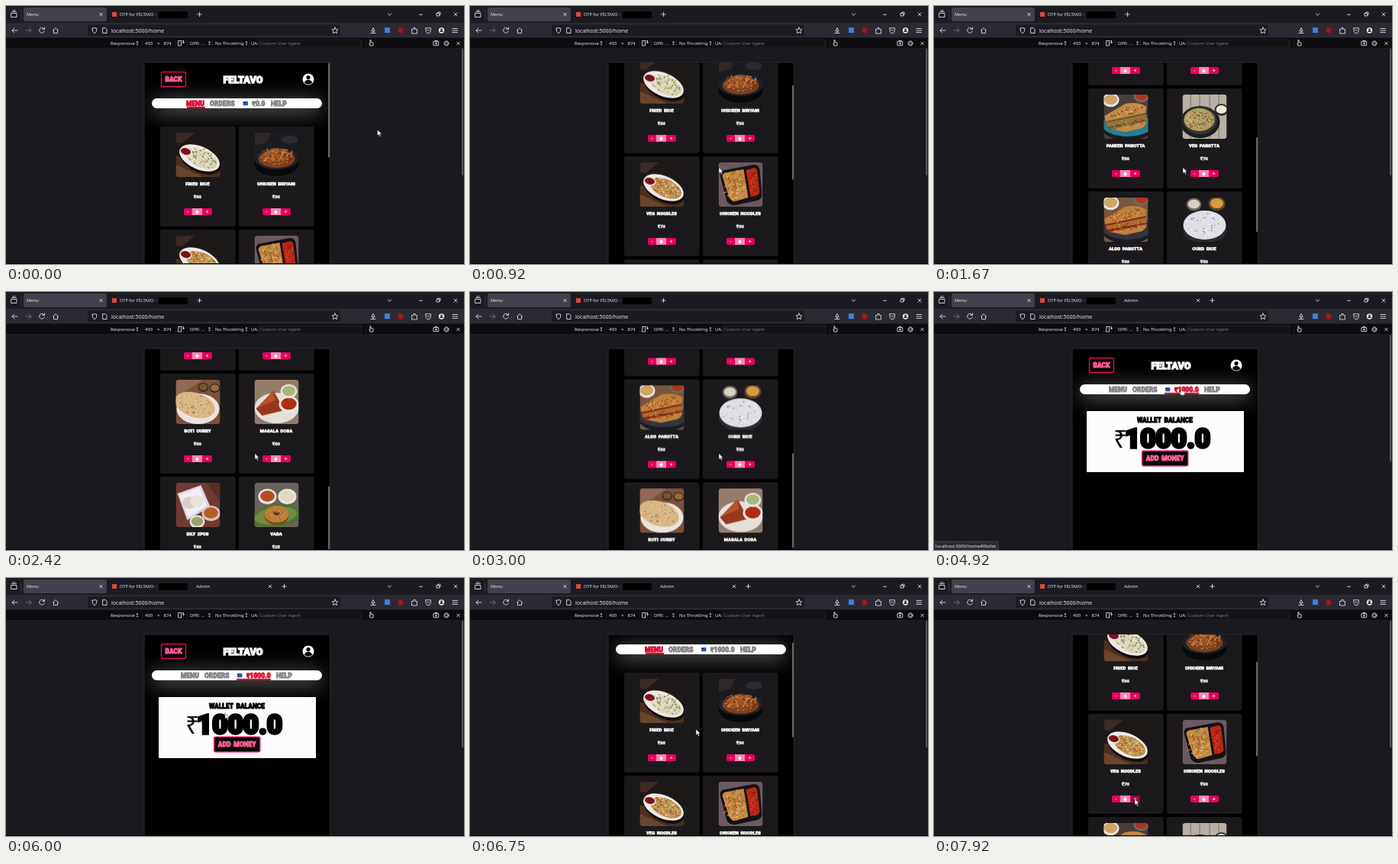
Animation of 600x338 px, one loop 8000 ms. Source, as an HTML page:

```html
<!DOCTYPE html>
<html lang="en">
<head>
<meta charset="utf-8">
<title>Menu</title>
<style>
@property --scroll { syntax: "<number>"; inherits: true; initial-value: 0; }
html, body { margin: 0; width: 100%; height: 100%; overflow: hidden; background: #1b1a1e; }
svg { position: fixed; inset: 0; width: 100vw; height: 100vh; animation: scroll 8s linear infinite; }
text { font-family: "Noto Sans", "Open Sans", sans-serif; white-space: pre; }
.block { font-family: Roboto, "Liberation Sans", sans-serif; font-weight: 900; word-spacing: .2em; stroke-width: .1em; fill: currentColor; stroke: currentColor; stroke-linejoin: miter; }
.mid { text-anchor: middle; }
.icon { fill: none; stroke: #e4e4ea; stroke-width: .85; stroke-linejoin: round; stroke-linecap: round; }
.pill { filter: drop-shadow(0 4px 13px rgba(255,255,255,.5)); }
.page { transform: translateY(calc(var(--scroll) * -1px)); }
.thumb { transform: translateY(calc(var(--scroll) * .3047px)); }
.cursor { animation: cursor 8s ease-in-out infinite; }
.step { animation: 8s step-end infinite; }
.before { animation-name: before; }
.after { animation-name: after; }
.grid { animation-name: grid; }
.wallet { animation-name: wallet; }
.paid { animation-name: paid; }
.linkWallet { animation-name: linkWallet; }
.linkMenu { animation-name: linkMenu; }
.hand { animation-name: hand; }
.arrow { animation-name: arrow; }
.zero { animation-name: zero; }
.one { animation-name: one; }
.hover { animation-name: hover; }
.bar { animation-name: bar; }
@keyframes scroll {
  0%, 7.5% { --scroll: 0; }
  20.85%, 21.87% { --scroll: 320; }
  30.2%, 32.2% { --scroll: 591; }
  44.7%, 45.87% { --scroll: 256; }
  51%, 82% { --scroll: 0; }
  84.3%, 85.37% { --scroll: 34; }
  88.5%, 100% { --scroll: 115; }
}
@keyframes cursor {
  0%, 1% { transform: translate(486.5px, 162px); }
  8%, 49% { transform: translate(326px, 211.5px); }
  54%, 64.6% { transform: translate(324px, 126px); }
  69%, 73% { transform: translate(301px, 192px); }
  79%, 81% { transform: translate(241px, 127px); }
  84.3%, 86% { transform: translate(296px, 198px); }
  91.5%, 94.5% { transform: translate(263px, 153px); }
  98.9%, 100% { transform: translate(263px, 289.5px); }
}
@keyframes before { 0% { opacity: 1; } 53.1%, 100% { opacity: 0; } }
@keyframes after { 0% { opacity: 0; } 53.1%, 100% { opacity: 1; } }
@keyframes grid { 0% { opacity: 1; } 57.3% { opacity: 0; } 80.5%, 100% { opacity: 1; } }
@keyframes wallet { 0% { opacity: 0; } 57.3% { opacity: 1; } 80.5%, 100% { opacity: 0; } }
@keyframes paid { 0% { opacity: 0; } 53.1% { opacity: 1; } 57.3% { opacity: 0; } 80.5%, 100% { opacity: 1; } }
@keyframes linkWallet { 0% { opacity: 0; } 54.2% { opacity: 1; } 64.6%, 100% { opacity: 0; } }
@keyframes linkMenu { 0% { opacity: 0; } 79.1% { opacity: 1; } 82.2%, 100% { opacity: 0; } }
@keyframes hand { 0% { opacity: 0; } 53.5% { opacity: 1; } 64.6% { opacity: 0; } 78.8% { opacity: 1; } 82%, 100% { opacity: 0; } }
@keyframes arrow { 0% { opacity: 1; } 53.5% { opacity: 0; } 64.6% { opacity: 1; } 78.8% { opacity: 0; } 82%, 100% { opacity: 1; } }
@keyframes zero { 0% { opacity: 1; } 93%, 100% { opacity: 0; } }
@keyframes one { 0% { opacity: 0; } 93%, 100% { opacity: 1; } }
@keyframes hover { 0% { opacity: 0; } 98.5%, 100% { opacity: 1; } }
@keyframes bar { 0% { opacity: 1; } 25% { opacity: 0; } 49%, 100% { opacity: 1; } }
</style>
</head>
<body>
<svg id="stage" viewBox="0 0 600 338" xmlns="http://www.w3.org/2000/svg"></svg>
<script>
const PINK = '#e8005f', ROSE = '#ff5f97', RED = '#dc0a2c', GREY = '#83838b', BRAND = 'FELTAVO';

const rect = (x, y, w, h, fill, extra = '') =>
  `<rect x="${x}" y="${y}" width="${w}" height="${h}" fill="${fill}" ${extra}/>`;
const oval = (x, y, rx, ry, fill, turn = 0) =>
  `<ellipse cx="${x}" cy="${y}" rx="${rx}" ry="${ry}" fill="${fill}" transform="rotate(${turn} ${x} ${y})"/>`;
const shape = (d, fill) => `<path d="${d}" fill="${fill}"/>`;
const poly = (points, fill) => `<polygon points="${points}" fill="${fill}"/>`;
const icon = (d, extra = '') => `<path class="icon" d="${d}" ${extra}/>`;
const ui = (x, y, str, size, fill = '#e6e6eb') =>
  `<text x="${x}" y="${y}" font-size="${size}" fill="${fill}">${str}</text>`;
const block = (x, y, str, size, color, mid = true) =>
  `<text class="block ${mid ? 'mid' : ''}" x="${x}" y="${y}" font-size="${size}" color="${color}">${str}</text>`;
const step = (name, body) => `<g class="step ${name}">${body}</g>`;

// Short strokes scattered over a tilted ellipse: rice, noodles, spices.
function grains(x, y, rx, ry, colors, seed, count = 36, length = 3, turn = 0) {
  const random = () => (seed = (seed * 16807) % 2147483647) / 2147483647;
  for (let i = 0; i < 5; i++) random();
  let out = '';
  for (let i = 0; i < count; i++) {
    const a = random() * 6.283, r = Math.sqrt(random()), b = random() * 6.283;
    const px = x + rx * r * Math.cos(a), py = y + ry * r * Math.sin(a);
    const dx = length * Math.cos(b), dy = length * Math.sin(b);
    out += `<path d="M${px.toFixed(1)} ${py.toFixed(1)}l${dx.toFixed(1)} ${dy.toFixed(1)}" stroke="${colors[i % colors.length]}"/>`;
  }
  return `<g transform="rotate(${turn} ${x} ${y})">${out}</g>`;
}

const bowl = (x, y, r, fill, rim = '#e9e4dc') => oval(x, y, r, r * .85, rim) + oval(x, y - .5, r * .78, r * .6, fill);
const ovalPlate = (food, colors, seed) =>
  rect(0, 0, 58, 58, '#1e1817') + poly('0,30 58,48 58,58 0,58', '#4b2f20') + poly('0,42 36,58 0,58', '#6b452c') + poly('0,0 25,0 8,14 0,13', '#3b2a25') +
  oval(32, 37, 28, 15, '#100b0a', 24) + oval(31, 33, 28, 15, '#eeeae8', 24) + oval(34, 34, 22, 11.5, food, 24) +
  grains(34, 33, 20, 11, colors, seed, 90, 2.5, 24) + oval(13, 25, 8, 5.5, '#e4dcda', 14) + oval(13, 24.5, 6.6, 4.3, '#7e1119', 14);
const stack = (back, plate, bread, filling, seed) =>
  rect(0, 0, 58, 58, back) + bowl(9, 7, 11, '#d0a465') + bowl(49, 2, 10, '#a9351f', '#77675b') +
  oval(31, 43, 34, 17, '#191c24') + oval(31, 40, 33, 15, plate) +
  poly('1,34 53,22 56,28 3,41', filling) + shape('M1 28L28 12Q46 9 56 16L55 24L2 35Z', bread) +
  poly('3,42 55,32 56,36 8,46', filling) + shape('M3 37L56 26L56 33L4 42Z', '#a86c31') + shape('M8 45L56 35Q56 40 50 44L28 49Z', bread) +
  grains(30, 23, 24, 6, ['#8a4a1c', '#e6b570', '#6b3a18'], seed, 40, 2.5, -14) + grains(32, 39, 23, 5, ['#6f401c', filling, '#dba25a'], seed + 2, 34, 2.5, -12);

const dishes = [
  ['FRIED RICE', 60, ovalPlate('#d9d5b8', ['#fbf8e6', '#7f9650', '#c9a862', '#f0ead0', '#5f5840'], 11)],
  ['CHICKEN BIRYANI', 90, rect(0, 0, 58, 58, '#1b1c20') + poly('0,0 22,0 16,13 0,17', '#2f2826') + oval(46, 9, 11, 5, '#2b2c31') +
    oval(29, 41, 29, 16, '#08090b') + oval(29, 34, 29, 14, '#212226') + oval(29, 34, 24, 12, '#7d3f1f') +
    oval(29, 29, 15, 9, '#9d5528') + grains(29, 31, 22, 11, ['#d8934d', '#552712', '#e0a962', '#a94f20'], 23, 90)],
  ['VEG NOODLES', 70, ovalPlate('#c59455', ['#ecc67e', '#7c421f', '#f0dfae', '#6e7d40', '#b5562a'], 31)],
  ['CHICKEN NOODLES', 90, rect(0, 0, 58, 58, '#6d5a60') + shape('M2 17Q2 10 9 10L46 3Q53 3 54 9L57 42Q57 48 51 50L22 56Q15 57 11 51Z', '#151113') +
    shape('M5 18Q6 13 12 13L33 9L39 46L22 51Q17 51 14 46Z', '#c28844') + shape('M36 10L47 7Q51 8 51 13L54 39Q53 43 48 44L42 45Z', '#b92716') +
    grains(22, 30, 13, 18, ['#ecc078', '#8d5122', '#dca451', '#a8652b'], 43, 85, 5) + grains(46, 26, 5, 16, ['#e3502e', '#7e150e'], 5, 30)],
  ['PANEER PAROTTA', 60, stack('#4a3d3b', '#237f92', '#c28a46', '#56633c', 57)],
  ['VEG PAROTTA', 70, rect(0, 0, 58, 58, '#b8b0a4') + [10, 22, 35, 47].map(x => rect(x, 0, 1.2, 58, '#857d74')).join('') +
    oval(23, 36, 26, 21, '#1d1d1e') + oval(23, 34, 22, 18, '#393836') + oval(22, 33, 20, 15, '#b29c62') +
    grains(22, 33, 18, 13, ['#4e4222', '#d9c88c', '#755a2a'], 61, 80, 2.2) + bowl(51, 20, 9, '#eee9d9', '#2d2c2b')],
  ['ALOO PAROTTA', 60, stack('#78563f', '#34343d', '#c17f3b', '#8e2815', 71)],
  ['CURD RICE', 50, rect(0, 0, 58, 58, '#1c1a1e') + bowl(15, 9, 10, '#d7cec2', '#6b6058') + bowl(45, 8, 11, '#d79a3d', '#60452e') +
    oval(29, 42, 29, 18, '#2c2a30') + oval(29, 36, 28, 19, '#dedee4') + grains(29, 36, 24, 15, ['#fff', '#bfc0c9', '#f1f1f4', '#716d74'], 83, 70, 2)],
  ['ROTI CURRY', 60, rect(0, 0, 58, 58, '#7c513b') + poly('0,0 35,0 0,24', '#946853') + bowl(36, 10, 7, '#78552a', '#342d28') + bowl(51, 11, 7, '#9b6d2c', '#342d28') +
    oval(29, 38, 28, 20, '#e9e4e0') + oval(25, 33, 27, 16, '#d8b784', 18) + grains(25, 33, 24, 13, ['#8b5a2c', '#efd6aa', '#b98c50'], 97, 56, 2, 18)],
  ['MASALA DOSA', 60, rect(0, 0, 58, 58, '#947c6c') + oval(29, 37, 29, 20, '#e4dfdb') + poly('2,38 25,14 39,40 10,47', '#98371b') + poly('2,38 25,14 27,27', '#b5532a') +
    bowl(45, 32, 13, '#ad2c17') + bowl(45, 15, 11, '#a9b67b')],
  ['IDLY 2PCS', 40, rect(0, 0, 58, 58, '#703a34') + poly('40,0 58,0 58,24', '#553029') + poly('2,14 33,3 45,31 15,49', '#dcd5df') + poly('5,16 31,6 41,30 16,45', '#f3edf3') +
    oval(18, 26, 9, 8, '#d5cecb') + oval(28, 24, 9, 8, '#e9e2dc') + bowl(46, 40, 12, '#b65d23', '#d4c4bd') + bowl(28, 51, 10, '#98a36b')],
  ['VADA', 25, rect(0, 0, 58, 58, '#6b625b') + oval(28, 44, 33, 16, '#536f34', -10) + oval(28, 43, 28, 11, '#728d43', -8) +
    bowl(17, 18, 12, '#b54c22') + bowl(43, 18, 12, '#e1dac0') + oval(29, 43, 16, 12, '#7b471f') + oval(29, 41, 16, 11, '#bb7e38') +
    oval(29, 40, 4, 2.5, '#5c3519') + grains(29, 40, 13, 8, ['#d9a557', '#925b27'], 113, 30, 1.5)],
];

function card([name, price, art], i) {
  const x = i % 2 ? 305 : 202, y = 158 + 135 * Math.floor(i / 2), mid = x + 49;
  const digit = n => block(mid - .5, y + 114, n, 6, '#fff');
  return rect(x, y, 98.5, 130.7, '#1b191b', 'rx="2"') +
    `<g transform="translate(${x + 20.5} ${y + 8})" clip-path="url(#photo)">${art}</g>` +
    block(mid, y + 76.6, name, 5.9, '#fff') +
    block(mid, y + 94.4, '₹' + price, 5.9, '#e0e0e0') +
    rect(x + 31, y + 107, 37, 9, PINK, 'rx="2"') +
    (i === 2 ? step('hover', rect(x + 56, y + 107, 12, 9, '#a30042', 'rx="2"')) : '') +
    rect(x + 42, y + 107, 13, 9, '#f485b2') +
    icon(`M${x + 35.5} ${y + 111.8}h1.4M${x + 60.2} ${y + 111.5}h2.8m-1.4 -1.4v2.8`, 'stroke-width=".7"') +
    (i === 0 ? step('zero', digit(0)) + step('one', digit(1)) : digit(0));
}

function nav(x, balance, walletActive = false) {
  const money = balance === '0.0' ? 322.5 : 315, help = balance === '0.0' ? 347 : 354;
  const [menuColor, moneyColor] = walletActive ? [GREY, RED] : [RED, GREY];
  const item = (at, label, color = GREY) => block(at, 130.8, label, 8.5, color, false);
  return item(x, 'MENU', menuColor) + item(x + 31, 'ORDERS') + item(money, '₹' + balance, moneyColor) + item(help, 'HELP') +
    rect(money - 12, 125, 6.5, 5.2, '#285fae', 'rx=".7"') + rect(money - 12, 126, 4, 1, '#16305e') +
    (walletActive ? rect(302, 131.8, 45, 2.2, RED) : rect(x + 1, 131.8, 24, 2.2, RED));
}

const button = (x, y, w, h, label) =>
  rect(x, y, w, h, '#050305', `rx="2" stroke="${PINK}" stroke-width="1.4"`) + block(x + w / 2, y + h / 2 + 3, label, 8.5, ROSE);

const header = button(203.5, 86.5, 32, 19, 'BACK') + block(310.5, 100.6, BRAND, 12.7, '#fff') +
  '<circle cx="396" cy="96" r="7.5" fill="#fff"/><circle cx="396" cy="93.6" r="2.6"/><path d="M391 101a5 4.2 0 0 1 10 0q-5 3.5-10 0"/>' +
  rect(191, 121, 223, 13, '#fff', 'rx="6.5" class="pill"');

const walletPage = rect(200, 156, 206, 80, '#fdfbfd') + block(302.5, 171.2, 'WALLET BALANCE', 8.4, '#000') +
  ui(235, 204, '₹', 32, '#000') + block(250, 203.5, '1000.0', 35, '#000', false) +
  button(272.7, 208.2, 60, 19.5, 'ADD MONEY');

const close = (x, y, r = 1.8) => icon(`M${x - r} ${y - r}l${2 * r} ${2 * r}m0 ${-2 * r}l${-2 * r} ${2 * r}`, 'stroke-width=".8"');
const plus = x => icon(`M${x - 2.7} 11h5.4m-2.7 -2.7v5.4`);
const updown = x => shape(`M${x - 1.4} 48l1.4 -2.2l1.4 2.2zm0 1.4l1.4 2.2l1.4 -2.2z`, '#d0d0d6');

const tabs = rect(0, 0, 600, 23, '#1c1b22') + rect(23, 2, 109, 18, '#42414d', 'rx="2.5"') +
  icon('M7 9.5h7v5h-7zM7.5 7.5h6M9 5.8h3') + rect(19.5, 5, .7, 13, '#45444d') +
  ui(27, 13.3, 'Menu', 5.9) + close(124.5, 11) +
  rect(139, 8, 6, 6, '#e0453c') + ui(149, 13.3, `OTP for ${BRAND} -`, 5.7) + rect(200, 7, 38, 9, '#000') +
  step('before', plus(253.5)) + step('after', ui(249, 13.3, 'Admin', 5.9) + close(346, 11) + plus(364.5)) +
  icon('M500.3 10l2.2 2.2l2.2 -2.2M541.5 11.3h4M564.3 9.6h3.4v3.4h-3.4zM565.6 9.4v-1.2h3.4v3.4h-1.2', 'stroke-width=".75"') + close(589, 11, 2);

const toolbar = rect(0, 22, 600, 20, '#2b2a33') + rect(107, 24.5, 331, 14.5, '#1c1b22', 'rx="2.5"') +
  icon('M15 32h-7m3 -3l-3 3l3 3') + icon('M26 32h7m-3 -3l3 3l-3 3', 'opacity=".4"') +
  icon('M50 30a3.4 3.4 0 1 0 .3 3M50.5 28v2.5h-2.5') + icon('M61.5 32l3.5 -3.3l3.5 3.3M62.5 31.5v4h5v-4') +
  icon('M113 29.5l3 -1l3 1q0 5 -3 6.5q-3 -1.5 -3 -6.5') + icon('M127 28.7h3.4l1.6 1.6v5.2h-5z', 'stroke-width=".8"') +
  ui(138, 34.6, 'localhost:5000/home', 7) +
  icon('M431 28l1.2 2.6l2.8 .3l-2.1 2l.6 2.8l-2.5 -1.4l-2.5 1.4l.6 -2.8l-2.1 -2l2.8 -.3z', 'stroke-width=".8"') +
  icon('M478 35.5h6M479 32.5l2 -4l2 4zM481 33v2') + rect(496, 28.2, 7, 7, '#3b82e0') +
  '<circle cx="517" cy="32" r="3.6" fill="#a8141d"/>' +
  icon('M532 30.5h2v-2h2v2h2.5v5.5h-6.5zM550 28.8h6.5v3q-.5 4 -3.3 4q-2.8 0 -3.2 -4zM551.6 31l1.6 1.6l1.6 -1.6') +
  '<circle cx="570.5" cy="32" r="3.7" fill="#eee"/><circle cx="570.5" cy="30.8" r="1.3" fill="#2b2a33"/><path d="M568 34a2.5 2 0 0 1 5 0z" fill="#2b2a33"/>' +
  icon('M585 29.5h6.5m-6.5 2.5h6.5m-6.5 2.5h6.5');

const device = rect(0, 41.5, 600, 14.5, '#0d0d0f') + rect(0, 55.3, 600, .7, '#2a2a2e') +
  ui(137, 50.7, 'Responsive', 6) + updown(172) + ui(182, 50.7, '493', 6) + ui(198, 50.7, '×', 6) + ui(206.5, 50.7, '874', 6) +
  icon('M226 45.5h3.5v6.5h-3.5zM231 45.5h1.5v3m-1.2 -1l1.2 1.2l1.2 -1.2', 'stroke-width=".8"') +
  ui(241, 50.7, 'DPR: ...', 5.9) + updown(266.5) + ui(274, 50.7, 'No Throttling', 6) + updown(315) +
  ui(321, 50.7, 'UA:', 6) + rect(331, 44, 135, 10, '#141416', 'stroke="#2c2c30" stroke-width=".6"') + ui(333, 50.7, 'Custom User Agent', 5.8, '#77777e') +
  [178, 222, 237, 270, 318, 471].map(x => rect(x, 44, .5, 10, '#29292d')).join('') +
  icon('M476 49l1 3h4v-4l-3 -.8v-2.5h-1v5', 'stroke-width=".7"') +
  icon('M560.3 46.7h6.4v5h-6.4zM562 46.5v-1h3v1M563.5 48v2.4m-1.2 -1.2h2.4', 'stroke-width=".7"') +
  '<circle class="icon" cx="577" cy="49" r="2.2"/><circle class="icon" cx="577" cy="49" r="3.2" stroke-dasharray="1 1.5"/>' + close(592.5, 49);

const phone = rect(181, 74, 243.5, 270, '#000', 'stroke="#343338" stroke-width=".8"') +
  `<g clip-path="url(#screen)"><g class="page">${header}` +
  step('before', nav(236, '0.0')) + step('paid', nav(229, '1000.0')) + step('wallet', nav(229, '1000.0', true)) +
  step('grid', dishes.map(card).join('')) + step('wallet', walletPage) + '</g>' +
  step('grid', rect(422, 74.5, 2, 124, '#67666b', 'class="thumb" rx="1"')) + '</g>';

const status = (name, width) => step('link' + name,
  rect(-1, 327, width, 12, '#2b2a33', 'stroke="#55545d" stroke-width=".7"') + ui(2, 334.6, 'localhost:5000/home#' + name, 5.9));

const cursor = '<g class="cursor">' +
  step('arrow', '<path d="M0 0v8l1.9 -1.7l1.4 3l1.3 -.6l-1.3 -2.9h2.5z" fill="#fff" stroke="#111" stroke-width=".5"/>') +
  step('hand', '<path d="M-.8 0q.8 -1 1.6 0v3.5l3.4 .8q.8 .4 .6 1.6l-.8 3.4h-4.4l-2.6 -3.6q.4 -1.2 2.2 .3z" fill="#fff" stroke="#111" stroke-width=".5"/>') + '</g>';

document.getElementById('stage').innerHTML =
  '<defs><clipPath id="screen"><rect x="181.5" y="74.5" width="242.5" height="264"/></clipPath>' +
  '<clipPath id="photo"><rect width="58" height="58" rx="4"/></clipPath></defs>' +
  rect(0, 0, 600, 338, '#1b1a1e') + tabs + toolbar + device + phone +
  step('bar', rect(597.3, 56, 1.6, 166, '#69686e', 'rx=".7"')) + rect(0, 337, 600, 1, '#050506') +
  status('Wallet', 85) + status('Menu', 82) + cursor;
</script>
</body>
</html>
```
